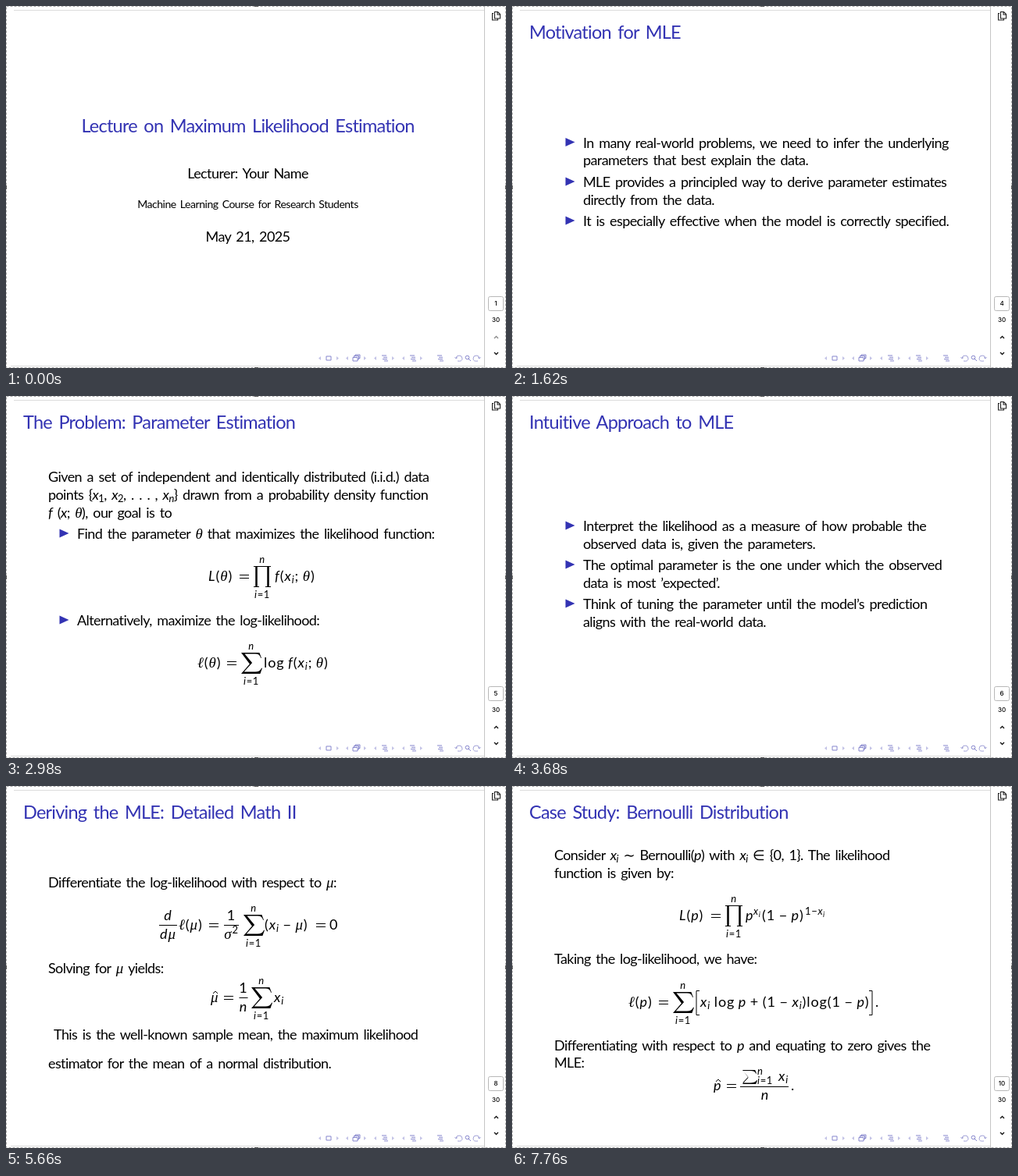
An HTML page for the animation above (8000 ms loop, 640x464 px).

```html
<!DOCTYPE html>
<html lang="en">
<head>
<meta charset="utf-8">
<title>Lecture slides</title>
<style>
html, body { margin: 0; width: 100%; height: 100%; overflow: hidden; background: #fff; }
svg { display: block; width: 640px; height: 464px; }
text { font: 18px Lato, "Open Sans", sans-serif; letter-spacing: -.033em; word-spacing: .14em; fill: #000; }
.title { font-size: 23.5px; fill: #3333b3; }
.small { font-size: 14px; }
.math { letter-spacing: .05em; word-spacing: -.05em; }
.limit { font-size: 13px; }
.blue { fill: #3333b3; }
.mid { text-anchor: middle; }
.var { font-style: italic; }
.greek { font-family: "Liberation Serif", "DejaVu Serif", serif; font-style: italic; font-size: 1.05em; }
.sub, .sup { font-size: .72em; }
.sub { baseline-shift: -3px; }
.sup { baseline-shift: 7px; }
.ui { font: 500 8px Inter, Roboto, sans-serif; letter-spacing: 0; text-anchor: middle; }
.stroke { fill: none; stroke: #000; stroke-width: 1; }
</style>
</head>
<body>
<svg viewBox="0 0 640 464">
  <g id="slide"></g>
  <g id="nav"></g>
  <g fill="none">
    <path d="M10 5.5H612M6 461.5H612" stroke="#dcdcdc"/>
    <path d="M612.5 0V464" stroke="#c6c6c6"/>
    <rect x=".5" y=".5" width="639" height="463" stroke="#a6a6a6" stroke-dasharray="3 2"/>
    <path d="M318 .5h5M318 463.5h5M.5 230v5M639.5 230v5" stroke="#555"/>
    <rect x="617.5" y="372.5" width="19" height="18" rx="2" stroke="#b8b8b8"/>
    <path d="M625.5 7.5h4l3 3v5.5h-7zM629 7.5v3.5h3.5M624 9.5h-1.5v8.5h7v-1.5" stroke="#222" stroke-width="1.1"/>
    <path id="up" d="M625 426l2.5-2.5 2.5 2.5" stroke-width="1.3"/>
    <path d="M625 444l2.5 2.5 2.5-2.5" stroke="#111" stroke-width="1.3"/>
  </g>
  <text id="page" class="ui" x="627" y="383.5"></text>
  <text class="ui" x="627" y="405">30</text>
</svg>
<script>
const LOOP = 8000;
const $ = id => document.getElementById(id);

// *x* is a variable, _{...} and ^{...} are sub- and superscripts.
const rich = s => s
  .replace(/[θμσλπℓ]/g, '<tspan class="greek">$&</tspan>')
  .replace(/\*(.+?)\*/g, '<tspan class="var">$1</tspan>')
  .replace(/([_^])\{(.*?)\}/g, (_, mark, body) =>
    `<tspan class="${mark === '_' ? 'sub' : 'sup'}">${body}</tspan>`);

const text = (x, y, s, cls = '') => `<text x="${x}" y="${y}" class="${cls}">${rich(s)}</text>`;
const math = (x, y, s, cls = '') => text(x, y, s, 'math ' + cls);
const stroke = (d, width = 1) => `<path class="stroke" style="stroke-width:${width}" d="${d}"/>`;
const title = s => text(22, 42, s, 'title');
const line = (y, s) => text(54, y, s);
const item = (y, ...lines) =>
  `<path class="blue" d="M68.5 ${y - 12.5}l12 5.5-12 5.5z"/>` +
  lines.map((s, i) => text(91, y + i * 22.7, s)).join('');

const equals = (x, y) => stroke(`M${x} ${y - 7.5}h12m-12 4h12`);
const hat = (x, y) => stroke(`M${x - 3} ${y}l3-3 3 3`);
const frac = (x, y, half, top, bottom) =>
  math(x, y - 12, top, 'mid') + stroke(`M${x - half} ${y - 5.5}h${2 * half}`) +
  math(x, y + 12, bottom, 'mid');

const sigma = (x, y, w, h) =>
  `<path d="M${x} ${y}h${w * .9}l${w * .1} ${h * .25}h-1q-1-${h * .19}-7-${h * .19}h-${w * .52}` +
  `l${w * .37} ${h * .42}-${w * .4} ${h * .43}h${w * .55}q6 0 8-${h * .18}h1l-${w * .1} ${h * .27}` +
  `H${x}l${w * .42}-${h * .46}z"/>`;
const limits = (x, y) =>
  math(x, y - 23, '*n*', 'limit mid') + math(x, y + 22, '*i*=1', 'limit mid');
const sum = (x, y) => sigma(x, y - 19, 26, 27) + limits(x + 13, y);
const prod = (x, y) =>
  stroke(`M${x} ${y - 18.5}h22m-22 26h7m8 0h7`) +
  stroke(`M${x + 3.5} ${y - 18}v25m15-25v25`, 2.5) + limits(x + 11, y);

const slides = [
  { at: 0, page: 1, art: [
    text(309.5, 162, 'Lecture on Maximum Likelihood Estimation', 'title mid'),
    text(309.5, 221, 'Lecturer: Your Name', 'mid'),
    text(309.5, 258.5, 'Machine Learning Course for Research Students', 'small mid'),
    text(309.5, 302, 'May 21, 2025', 'mid')] },
  { at: 40, page: 2, art: [
    title('Outline'),
    item(131, 'Introduction to MLE'),
    item(165, 'Motivation and Problem Setting'),
    item(199, 'Deriving the MLE'),
    item(233, 'MLE for Different Distributions'),
    item(267, 'Case Studies and Examples'),
    item(301, 'Properties of the MLE'),
    item(335, 'Conclusion')] },
  { at: 740, page: 3, art: [
    title('Introduction to MLE'),
    item(173, 'Maximum Likelihood Estimation (MLE) is a method for', 'estimating the parameters of a statistical model.'),
    item(223, 'It selects the parameter values that make the observed', 'data most probable.'),
    item(273, 'It is widely used in statistics and machine learning.')] },
  { at: 1620, page: 4, art: [
    title('Motivation for MLE'),
    item(181.5, 'In many real-world problems, we need to infer the underlying', 'parameters that best explain the data.'),
    item(232, 'MLE provides a principled way to derive parameter estimates', 'directly from the data.'),
    item(282, 'It is especially effective when the model is correctly specified.')] },
  { at: 2360, page: 5, art: [
    title('The Problem: Parameter Estimation'),
    line(110, 'Given a set of independent and identically distributed (i.i.d.) data'),
    line(133, 'points {*x*_{1}, *x*_{2}, . . . , *x*_{*n*}} drawn from a probability density function'),
    line(155.5, '*f* (*x*; θ), our goal is to'),
    item(183, 'Find the parameter θ that maximizes the likelihood function:'),
    math(259, 237, '*L*(θ)'), equals(299, 237), prod(317, 237), math(344, 237, '*f*(*x*_{*i*}; θ)'),
    item(294, 'Alternatively, maximize the log-likelihood:'),
    math(245, 348, 'ℓ(θ)'), equals(283, 348), sum(301, 348), math(330, 348, 'log *f*(*x*_{*i*}; θ)')] },
  { at: 3560, page: 6, art: [
    title('Intuitive Approach to MLE'),
    item(173, 'Interpret the likelihood as a measure of how probable the', 'observed data is, given the parameters.'),
    item(223, 'The optimal parameter is the one under which the observed', 'data is most ’expected’.'),
    item(273, 'Think of tuning the parameter until the model’s prediction', 'aligns with the real-world data.')] },
  { at: 4480, page: 7, art: [
    title('Deriving the MLE: Detailed Math I'),
    line(118, 'Consider data from a normal distribution with unknown mean μ'),
    line(141, 'and known variance σ^{2}. The likelihood function is:'),
    math(135, 200, '*L*(μ)'), equals(176, 200), prod(194, 200),
    frac(250, 200, 29, '1', '√(2πσ^{2})'), math(284, 200, 'exp( −'),
    frac(373, 200, 36, '(*x*_{*i*} − μ)^{2}', '2σ^{2}'), math(413, 200, ')'),
    line(262, 'The log-likelihood is then:'),
    math(128, 318, 'ℓ(μ)'), equals(167, 318), math(184, 318, '−'),
    frac(204, 318, 6, '*n*', '2'), math(214, 318, 'log(2πσ^{2}) −'),
    frac(335, 318, 14, '1', '2σ^{2}'), sum(354, 318), math(382, 318, '(*x*_{*i*} − μ)^{2}')] },
  { at: 5660, page: 8, art: [
    title('Deriving the MLE: Detailed Math II'),
    line(129.5, 'Differentiate the log-likelihood with respect to μ:'),
    frac(207.5, 184, 11.5, '*d*', '*d*μ'), math(221, 184, 'ℓ(μ)'), equals(260, 184),
    frac(288.5, 184, 9.5, '1', 'σ^{2}'), sum(304, 184),
    math(331, 184, '(*x*_{*i*} − μ)'), equals(397, 184), math(414, 184, '0'),
    line(240, 'Solving for μ yields:'),
    math(262, 277, 'μ'), hat(268, 266), equals(279, 277),
    frac(304, 277, 5.5, '1', '*n*'), sum(314, 277), math(343, 277, '*x*_{*i*}'),
    text(61, 325, 'This is the well-known sample mean, the maximum likelihood'),
    line(362, 'estimator for the mean of a normal distribution.')] },
  { at: 6480, page: 9, art: [
    title('MLE for Different Distributions'),
    line(151, 'Beyond the normal distribution, MLE can be applied to various'),
    line(174, 'probability models.'),
    item(201, 'For a Bernoulli model: estimating the probability parameter p.'),
    item(229, 'For an Exponential distribution: determining the rate', 'parameter λ.'),
    item(279, 'Other distributions including Poisson, Binomial, and Gamma.'),
    line(307, 'These examples illustrate the versatility of the MLE method in'),
    line(330, 'statistical inference.')] },
  { at: 7340, page: 10, art: [
    title('Case Study: Bernoulli Distribution'),
    line(95, 'Consider *x*_{*i*} ∼ Bernoulli(*p*) with *x*_{*i*} ∈ {0, 1}. The likelihood'),
    line(118, 'function is given by:'),
    math(214, 172, '*L*(*p*)'), equals(255, 172), prod(273, 172), math(299, 172, '*p*'),
    math(309, 165, '*x*_{*i*}', 'limit'), math(320, 172, '(1 − *p*)'), math(375, 165, '1−*x*_{*i*}', 'limit'),
    line(228, 'Taking the log-likelihood, we have:'),
    math(149, 283, 'ℓ(*p*)'), equals(188, 283), sum(206, 283),
    stroke('M240 262.5h-4v31h4M457 262.5h4v31h-4'),
    math(241, 283, '*x*_{*i*} log *p* + (1 − *x*_{*i*})log(1 − *p*)'), math(465, 283, '.'),
    line(339, 'Differentiating with respect to *p* and equating to zero gives the'),
    line(361, 'MLE:'),
    math(258, 390, '*p*'), hat(264, 379), equals(275, 390),
    sigma(295, 364, 18, 18), math(314, 370, '*n*', 'limit'), math(314, 382, '*i*=1', 'limit'),
    math(341, 378, '*x*_{*i*}'), stroke('M292 385.5h62'),
    math(324, 402, '*n*', 'mid'), math(357, 390, '.')] }
];

function drawNav() {
  const y = 451.5;
  const arrow = (x, dir) => `<path fill="#c2c2e6" d="M${x} ${y - 2.5}v5l${3 * dir}-2.5z"/>`;
  const pair = x => arrow(x - 10, -1) + arrow(x + 10, 1);
  const bars = x => `M${x - 3} ${y - 3.5}h6m-4 2.3h5m-6 2.3h6m-4 2.3h5`;
  $('nav').innerHTML = [413, 448, 484, 520].map(pair).join('') +
    `<g fill="none" stroke="#8585cd" stroke-width="1">
      <path d="M410 449h6v5h-6zM444 450.5h6v4.500h-6zM445.5 450v-1.5h6v4.5h-1.5M447 448v-1h6v4.5h-1.5"/>
      <path d="${bars(484)}${bars(520)}${bars(555)}"/>
      <path stroke="#a3a3d8" d="M578 455q6 1 6-3t-4-4-4 4m-1.5-2l1.5 2 2-1.5M604 455q-6 1-6-3t4-4 4 4m1.5-2l-1.5 2-2-1.5"/>
      <circle cx="590.5" cy="450.5" r="2.3"/><path d="M592 452l3 3"/>
    </g>`;
}

let current;
function tick() {
  const t = performance.now() % LOOP;
  const next = slides.filter(s => s.at <= t).pop();
  if (next !== current) {
    current = next;
    $('slide').innerHTML = next.art.join('');
    $('page').textContent = next.page;
    $('up').setAttribute('stroke', next.page > 1 ? '#111' : '#8a8a8a');
  }
  requestAnimationFrame(tick);
}

drawNav();
tick();
</script>
</body>
</html>
```
